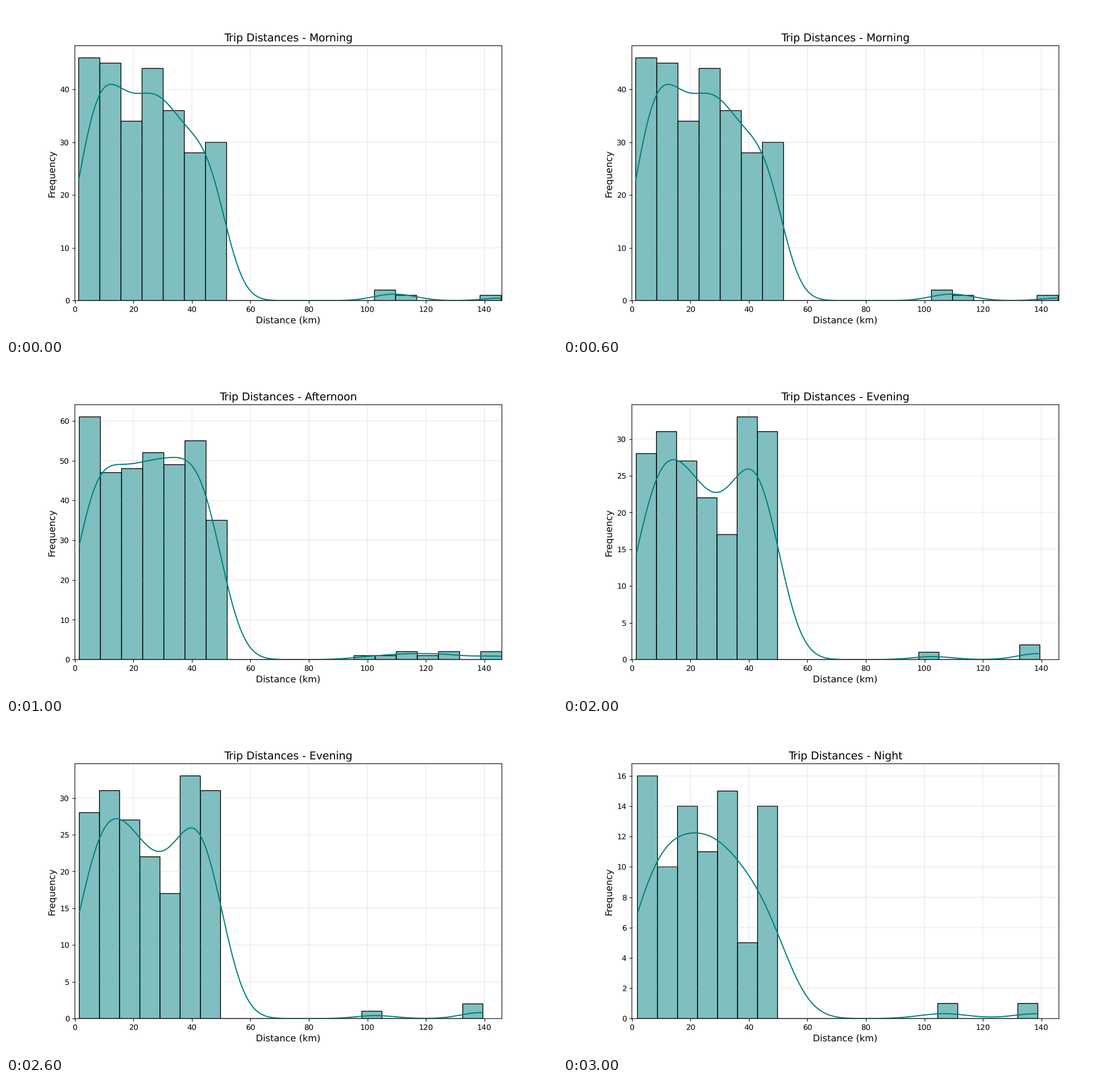
These frames come from a looping animation (966 by 580 pixels, 4000 ms). A matplotlib script:

```python
import numpy as np
import matplotlib.pyplot as plt
from matplotlib.animation import FuncAnimation

plt.rcParams.update({
    "font.family": "DejaVu Sans",
    "text.hinting": "none",
    "path.snap": False,
})

DPI = 96.6
BINS = 20
USUAL_MAX_KM = 50
AXIS_MAX_KM = 146
TEAL = (0, 128 / 255, 128 / 255)

# name, shortest and longest trip, usual trips per bin, other long trips
PERIODS = [
    ("Morning", 1.3, 145.75, [46, 45, 34, 44, 36, 28, 30], [105.5, 109, 114]),
    ("Afternoon", 1.5, 146, [61, 47, 48, 52, 49, 55, 35],
     [99, 107, 112, 116, 121, 126, 130, 141]),
    ("Evening", 1.5, 139.5, [28, 31, 27, 22, 17, 33, 31], [102.8, 138]),
    ("Night", 1.9, 138.8, [16, 10, 14, 11, 15, 5, 14], [106.7]),
]


def make_trips(edges, counts, long_trips):
    """Spread the usual trips evenly in their bins and add the long ones."""
    ends = np.minimum(edges[1:], USUAL_MAX_KM)
    usual = [start + (np.arange(n) + 0.5) / n * (end - start)
             for start, end, n in zip(edges, ends, counts)]
    return np.concatenate([*usual, long_trips, edges[-1:]])


def density_curve(trips, edges):
    """Gaussian KDE with Scott's bandwidth, scaled to the bar heights."""
    width = trips.std(ddof=1) * len(trips) ** -0.2
    x = np.linspace(edges[0], edges[-1], 200)
    kernels = np.exp(-0.5 * ((x[:, None] - trips) / width) ** 2)
    step = edges[1] - edges[0]
    return x, kernels.sum(axis=1) * step / (width * np.sqrt(2 * np.pi))


def draw(i):
    name, low, high, counts, long_trips = PERIODS[i]
    edges = np.linspace(low, high, BINS + 1)
    trips = make_trips(edges, counts, long_trips)

    ax.clear()
    ax.hist(trips, edges, facecolor=(*TEAL, 0.5), edgecolor="black",
            linewidth=1)
    ax.plot(*density_curve(trips, edges), color=TEAL, linewidth=1.5)
    ax.set_xlim(0, AXIS_MAX_KM)
    ax.set_ylim(0, max(counts) * 1.05)
    ax.set_title(f"Trip Distances - {name}", fontsize=14)
    ax.set_xlabel("Distance (km)", fontsize=12)
    ax.set_ylabel("Frequency", fontsize=12)
    ax.grid(True, alpha=0.3)
    return []


fig, ax = plt.subplots(figsize=(10, 580.001 / DPI), dpi=DPI)
anim = FuncAnimation(fig, draw, frames=len(PERIODS), interval=1000,
                     init_func=lambda: draw(0), repeat=True, repeat_delay=0)
plt.show()
```
